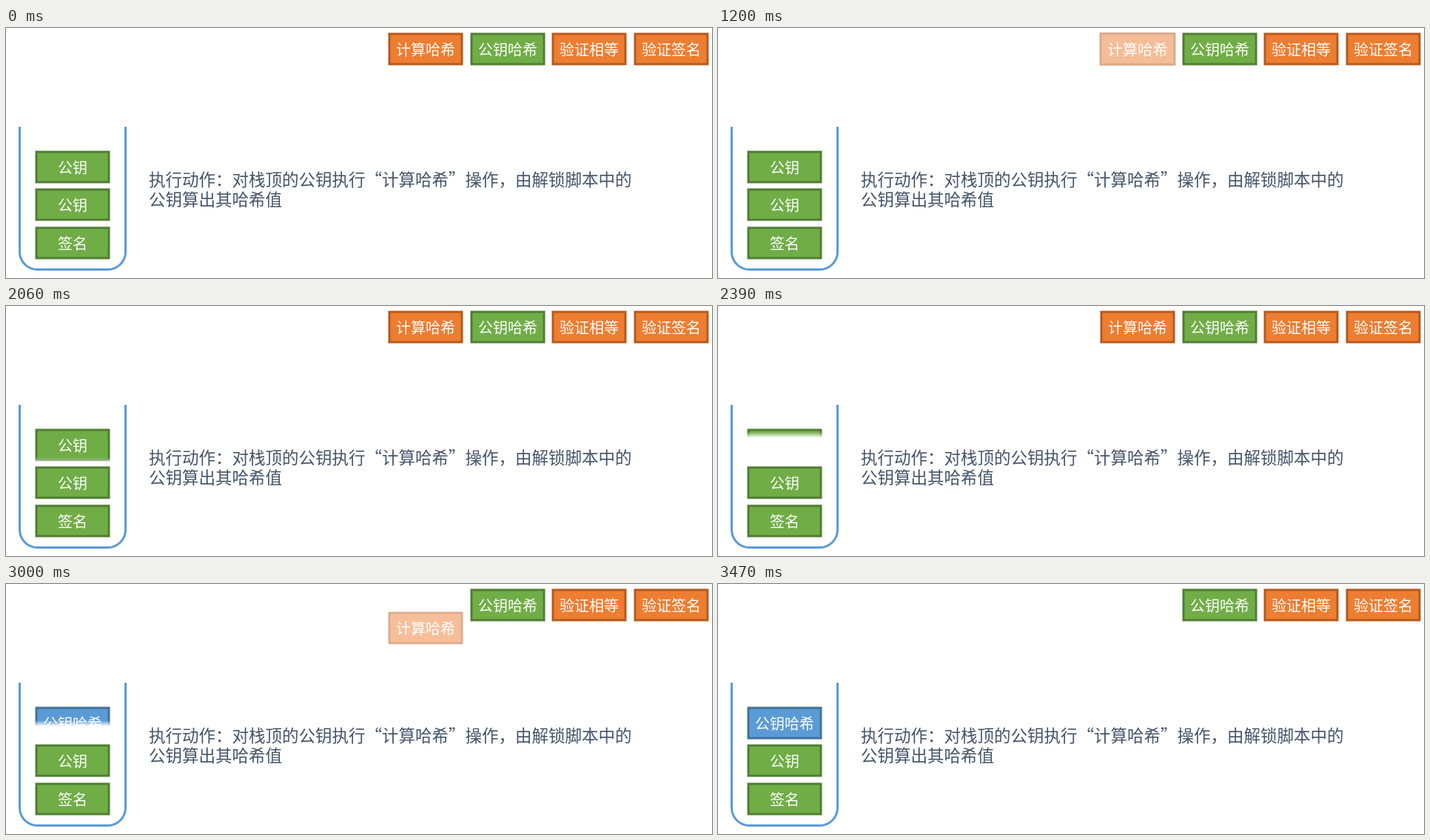
Write an HTML page that moves like this. It is 954x339 px and loops after 6.95 s.

```html
<!DOCTYPE html>
<html lang="zh-CN">
<head>
<meta charset="utf-8">
<style>
  html, body { margin: 0; width: 100%; height: 100%; overflow: hidden; background: #fff; }
  body { position: relative; font-family: "Noto Sans CJK SC", "Noto Sans CJK", sans-serif; font-weight: 300; }
  svg, p { position: absolute; stroke-width: 3px; }
  #stack { left: 0; top: 0; fill: none; stroke: #5b9bd5; }
  .box { width: 102px; height: 45px; }
  .box text { fill: #fff; font-size: 20px; text-anchor: middle; }
  .orange rect { fill: #ed7d31; stroke: #b65a1d; }
  .green rect { fill: #70ad47; stroke: #507e32; }
  .blue rect { fill: #5b9bd5; stroke: #41719c; }
  p {
    margin: 0; left: 193px; top: 191px; color: #44546a;
    font-size: 22.5px; line-height: 27px; white-space: nowrap;
  }
</style>
</head>
<body>
<svg id="stack" width="954" height="339">
  <path d="M18.5 134V303.5a24 24 0 0 0 24 24H137.5a24 24 0 0 0 24-24V134"/>
</svg>
<p>执行动作：对栈顶的公钥执行“计算哈希”操作，由解锁脚本中的<br>公钥算出其哈希值</p>
<script>
const LOOP = 6950, SOFT = 8, HEIGHT = 45;
// The motion is held between these moments.
const TICKS = [0, 820, 900, 980, 1050, 1130, 1200, 1290, 1370,
  2060, 2150, 2230, 2310, 2390, 2460, 2540, 2620, 2710,
  2770, 2850, 2930, 3000, 3090, 3160, 3240, 3310, 3390, 3470];

function box(label, color, x, y) {
  document.body.insertAdjacentHTML('beforeend',
    `<svg class="box ${color}" style="left:${x}px;top:${y}px">
      <rect x="2" y="2" width="98" height="41"/><text x="51" y="31">${label}</text>
    </svg>`);
  return document.body.lastElementChild;
}

const operation = box('计算哈希', 'orange', 516, 6);
box('公钥哈希', 'green', 627, 6);
box('验证相等', 'orange', 737, 6);
box('验证签名', 'orange', 848, 6);
box('签名', 'green', 39, 269);
box('公钥', 'green', 39, 217);
const key = box('公钥', 'green', 39, 166);
const hash = box('公钥哈希', 'blue', 39, 166);

const progress = (t, start, end) => Math.min(1, Math.max(0, (t - start) / (end - start)));

// Shows the upper part of a box, with a soft lower edge.
function wipe(el, amount) {
  const edge = amount * (HEIGHT + SOFT);
  el.style.visibility = amount > 0 ? 'visible' : 'hidden';
  el.style.maskImage = amount < 1
    ? `linear-gradient(#000 ${edge - SOFT}px, transparent ${edge}px)` : 'none';
}

function draw(time) {
  const t = TICKS.findLast(tick => tick <= time);
  const pulse = progress(t, 800, 1300);
  const leave = progress(t, 2510, 3470);
  const dim = Math.min(0.5, 2.5 * pulse, 2.5 * (1 - pulse));
  const scale = 1 + 0.05 * (1 - Math.abs(2 * pulse - 1));
  operation.style.opacity = (1 - dim) * (1 - leave);
  operation.style.transform = `translateY(${61 * leave}px) scale(${scale})`;
  wipe(key, 1 - progress(t, 2010, 2510));
  wipe(hash, leave);
}

function frame() {
  draw(performance.now() % LOOP);
  requestAnimationFrame(frame);
}
frame();
</script>
</body>
</html>
```
